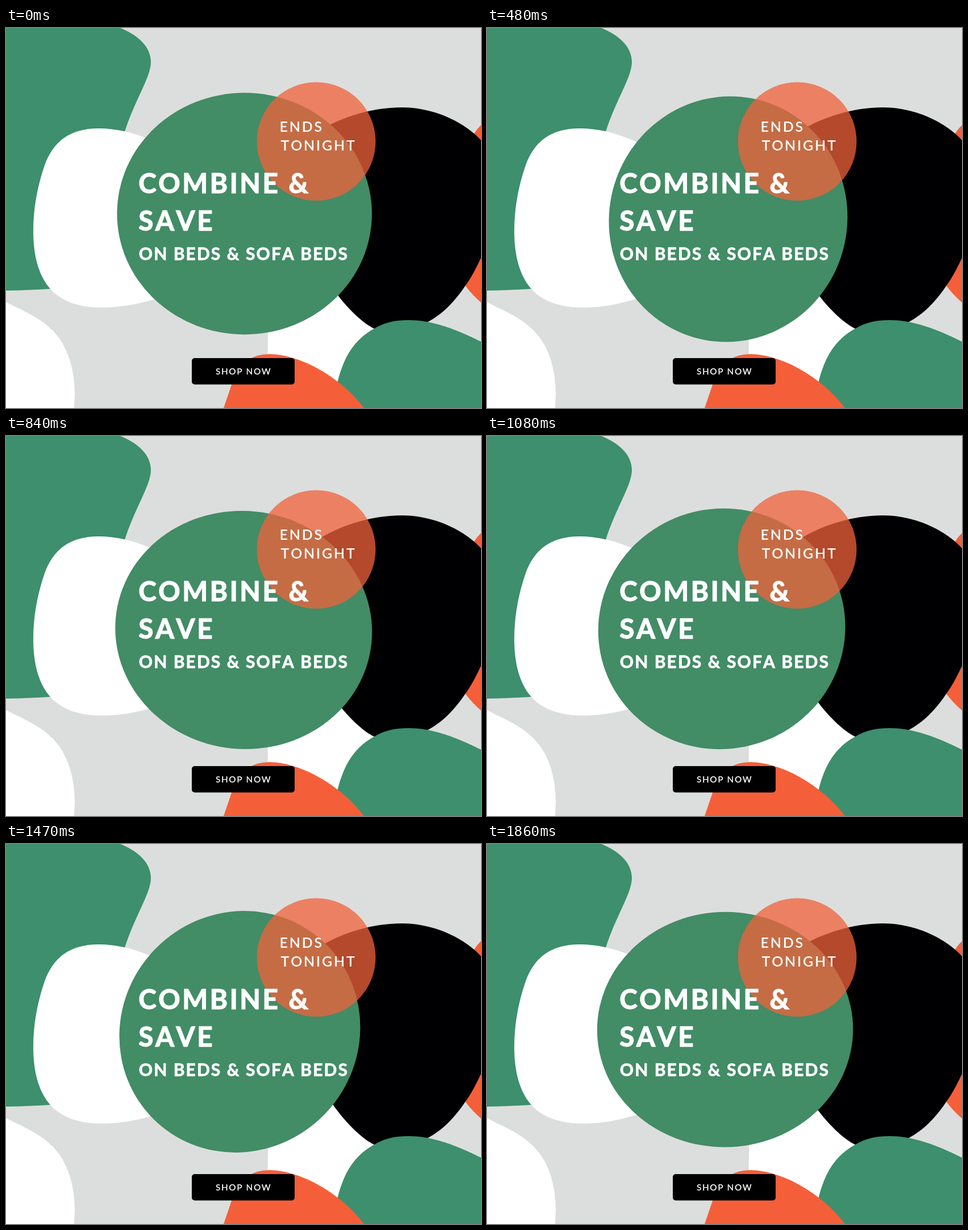
An HTML page for the animation above (1890 ms loop, 836x670 px).

```html
<!DOCTYPE html>
<html lang="en">
<head>
<meta charset="utf-8">
<title>Combine &amp; Save</title>
<style>
html, body { margin: 0; width: 100%; height: 100%; overflow: hidden; background: #dcdedd; }
svg { display: block; width: 100%; height: 100%; }
text { font-family: Lato, "Open Sans", sans-serif; font-weight: 700; font-kerning: none; fill: #fff; stroke: #fff; stroke-width: 0; }
.head { font-size: 47.5px; letter-spacing: 3.6px; stroke-width: 1.4px; }
.sub { font-size: 30px; letter-spacing: 2.1px; stroke-width: .8px; }
.badge { font-size: 25px; letter-spacing: 2.8px; font-weight: 600; }
.cta { font-size: 15.3px; letter-spacing: 1.6px; font-weight: 600; }
.green { fill: #3d8f6d; }
.orange { fill: #f45f39; }
.white { fill: #fff; }
</style>
</head>
<body>
<svg viewBox="0 0 836 670">
  <path class="green" d="M0 0H201C232 12 255 33 255 60S226 128 209 183L90 459Q50 462 0 463Z"/>
  <path class="white" d="M163 177C196 177 232 186 262 201C340 240 340 450 264 477C235 487 200 493 168 493C132 493 98 483 78 460C57 436 48 400 48 358S56 277 68 242C83 200 113 177 163 177Z"/>
  <path class="white" d="M0 483C30 500 65 510 92 545C110 568 121 605 121 646L120 670H0Z"/>
  <path class="white" d="M463 500Q460.5 540 460.5 580L600 660L660 520L560 430Z"/>
  <path class="orange" d="M836 171Q828 179 822 189L780 250L808 454Q820 470 836 484Z"/>
  <path fill="#000003" d="M540 189C580 160 640 140 697 140S808 167 836 198V405C827 425 817 443 808 455C790 482 770 503 743 518C710 535 670 540 648 530S598 490 583 470C560 440 545 400 540 350Z"/>
  <path class="green" d="M584 622C595 580 612 550 648 530C668 518 688 515 708 515C755 515 800 535 836 553V670H570Z"/>
  <path class="orange" d="M383 670L397 629C410 590 432 575 464 575C514 575 588 613 630 670Z"/>
  <circle id="blob" r="1" fill="#428c66"/>
  <circle cx="546" cy="200" r="104.5" fill="#f0623a" fill-opacity=".75"/>
  <text class="badge" x="481.5" y="183">ENDS</text>
  <text class="badge" x="483.5" y="215.5">TONIGHT</text>
  <text class="head" x="233.3" y="291">COMBINE &amp;</text>
  <text class="head" x="233.3" y="356.5">SAVE</text>
  <text class="sub" x="233.8" y="408.7">ON BEDS &amp; SOFA BEDS</text>
  <rect x="327" y="582" width="181" height="46.5" rx="5"/>
  <text class="cta" x="369" y="610.5">SHOP NOW</text>
</svg>
<script>
const LOOP = 1890, STEP = 30, TURN = 2 * Math.PI;
const blob = document.getElementById('blob');

// p runs from 0 to 1 over the loop
function pose(p) {
  const wave = (cycles, peak) => Math.cos(TURN * cycles * (p - peak));
  const squash = wave(2, 0.45);
  // Two quick wobbles, then one slow lean to the right
  const lean = p < 0.5 ? -4 * Math.sin(3 * TURN * p) : -8 * Math.sin(TURN * p);
  return {
    x: 417.8 + 7 * wave(1, 0.206),
    y: 334.5 + 7.5 * wave(1, 0.45),
    rx: 217 + 9 * squash,
    ry: 215.5 - 5.5 * p - 3 * squash,
    shear: -lean / 2
  };
}

function draw() {
  const t = performance.now() % LOOP;
  const { x, y, rx, ry, shear } = pose(Math.floor(t / STEP) * STEP / LOOP);
  blob.setAttribute('transform', `matrix(${rx} ${shear} ${shear} ${ry} ${x} ${y})`);
  requestAnimationFrame(draw);
}
draw();
</script>
</body>
</html>
```
